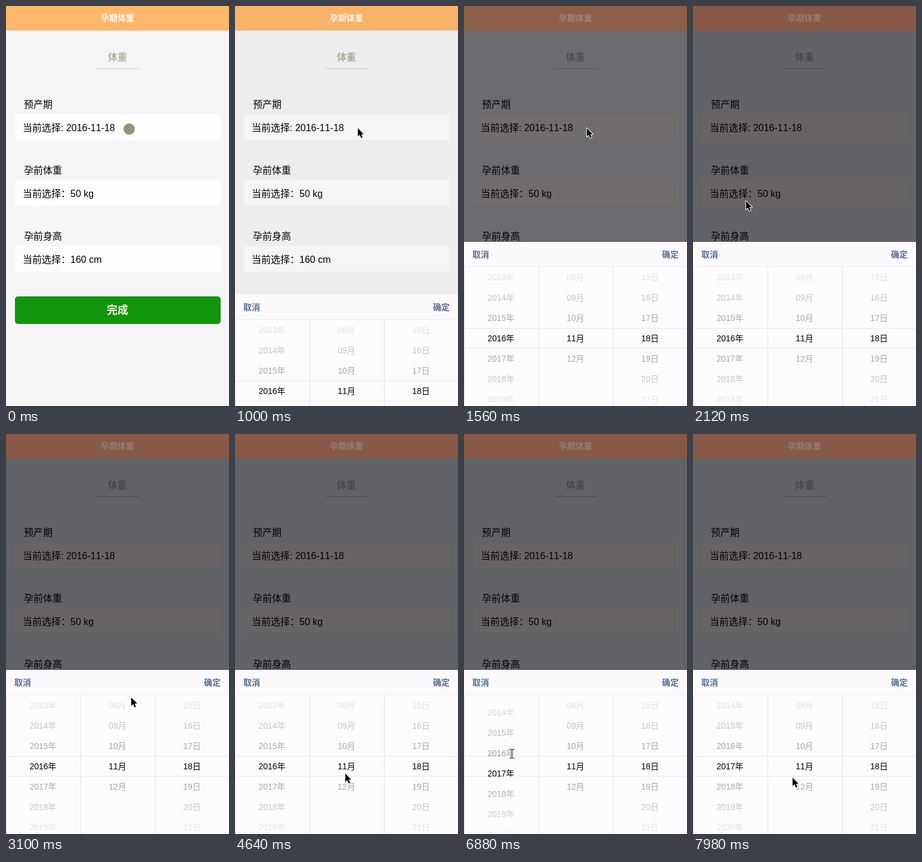
Write an HTML page with a canvas that moves like this. It is 374 by 668 pixels and loops after 8 s.

```html
<!DOCTYPE html>
<html lang="zh-CN">
<head>
<meta charset="utf-8">
<title>孕期体重</title>
<style>
  html, body { margin: 0; width: 100%; height: 100%; overflow: hidden; }
  canvas { display: block; width: 374px; height: 668px; }
</style>
</head>
<body>
<canvas id="stage"></canvas>
<script>
const W = 374, H = 668, LOOP = 8000;
const ROW = 34, SELECTED_Y = 555, PANEL_TOP = 394, LIST_TOP = 436;
const FAMILY = '"Liberation Sans", "Noto Sans CJK SC", "Noto Sans CJK", sans-serif';
const canvas = document.getElementById('stage');
const ctx = canvas.getContext('2d');
const ratio = window.devicePixelRatio || 1;
canvas.width = W * ratio;
canvas.height = H * ratio;
ctx.fontKerning = 'none';

// Text shades fade away from the selected row.
const listInk = ctx.createLinearGradient(0, LIST_TOP, 0, H);
[[436, '#f0f0f1'], [539, '#999'], [539, '#000'], [572, '#000'], [572, '#999'], [668, '#ededee']]
  .forEach(([y, color]) => listInk.addColorStop((y - LIST_TOP) / (H - LIST_TOP), color));

// time, x, y of the pointer tip
const POINTER_PATH = [
  [0, 206, 204], [1700, 206, 204], [2450, 8, 410], [2600, 5, 412], [2850, 364, 415],
  [3100, 210, 440], [3400, 200, 470], [4300, 185, 567], [5000, 185, 567],
  [5400, 355, 562], [6200, 80, 556], [6600, 80, 556], [6880, 80, 534],
  [7250, 80, 534], [7800, 167, 574], [8000, 167, 574]
];

const clamp = v => Math.min(1, Math.max(0, v));
const progress = (t, from, to) => clamp((t - from) / (to - from));
const smooth = p => p * p * (3 - 2 * p);
const easeOut = p => 1 - (1 - p) ** 3;
const lerp = (a, b, p) => a + (b - a) * p;
const mix = (a, b, p) => `rgb(${a.map((v, i) => Math.round(lerp(v, b[i], p))).join()})`;

function rect(x, y, w, h, color) {
  ctx.fillStyle = color;
  ctx.fillRect(x, y, w, h);
}

function text(str, x, y, size, color, align = 'left', weight = 400) {
  ctx.font = `${weight} ${size}px ${FAMILY}`;
  ctx.textAlign = align;
  ctx.fillStyle = color;
  ctx.fillText(str, x, y);
}

function drawField(label, value, y, dim) {
  text(label, 30, y - 10, 16, '#000');
  rect(15, y, 345, 45, mix([246, 246, 244], [101, 98, 99], dim));
  rect(15, y + 1, 345, 43, mix([253, 253, 255], [104, 100, 101], dim));
  text(value, 28, y + 29, 16, '#000');
}

function drawPage(dim) {
  rect(0, 0, W, H, mix([245, 245, 246], [97, 99, 102], dim));
  rect(0, 0, W, 41, mix([255, 183, 108], [135, 89, 70], dim));
  text('孕期体重', 187, 25, 14, mix([255, 250, 238], [152, 124, 114], dim), 'center', 700);
  text('体重', 187, 91, 16, mix([180, 177, 158], [72, 72, 72], dim), 'center', 700);
  rect(152, 104, 72, 1, mix([205, 206, 180], [72, 74, 76], dim));
  drawField('预产期', '当前选择: 2016-11-18', 180, dim);
  drawField('孕前体重', '当前选择：50 kg', 290, dim);
  drawField('孕前身高', '当前选择：160 cm', 400, dim);
  ctx.fillStyle = mix([17, 149, 12], [7, 60, 5], dim);
  ctx.beginPath();
  ctx.roundRect(15, 485, 345, 46, 5);
  ctx.fill();
  text('完成', 187, 514, 18, mix([248, 250, 225], [100, 102, 95], dim), 'center', 700);
}

function drawColumn(x, selected, first, last, unit, shift) {
  for (let n = first; n <= last; n++) {
    const y = SELECTED_Y + (n - selected) * ROW - shift;
    text(String(n).padStart(2, '0') + unit, x, y + 5, 14, listInk, 'center');
  }
}

function drawPanel(offset, shift) {
  ctx.save();
  ctx.translate(0, offset);
  rect(0, PANEL_TOP, W, H - PANEL_TOP, '#fcfcfe');
  rect(0, PANEL_TOP, W, LIST_TOP - PANEL_TOP, '#fbf9fc');
  text('取消', 14, 420, 14, '#586c94', 'left', 700);
  text('确定', 360, 420, 14, '#586c94', 'right', 700);
  rect(0, 435, W, 1, '#ececee');
  for (const x of [0, 125, 250]) rect(x, LIST_TOP, 1, H - LIST_TOP, '#e4e4e8');
  for (const y of [538, 571]) rect(0, y, W, 1, '#e6e6ec');
  ctx.beginPath();
  ctx.rect(0, LIST_TOP, W, H - LIST_TOP);
  ctx.clip();
  drawColumn(62, 2016, 2012, 2021, '年', shift);
  drawColumn(187, 11, 8, 12, '月', 0);
  drawColumn(312, 18, 15, 21, '日', 0);
  ctx.restore();
}

function pointerAt(t) {
  const i = Math.max(1, POINTER_PATH.findIndex(p => p[0] > t));
  const [t0, x0, y0] = POINTER_PATH[i - 1], [t1, x1, y1] = POINTER_PATH[i];
  const p = smooth(progress(t, t0, t1));
  return [lerp(x0, x1, p), lerp(y0, y1, p)];
}

function outlined(path, outline, fill) {
  ctx.lineWidth = 2;
  ctx.lineJoin = 'round';
  ctx.strokeStyle = outline;
  ctx.stroke(path);
  ctx.fillStyle = fill;
  ctx.fill(path);
}

const arrow = new Path2D('M0 0V14L3.2 11L5.6 16.4L8 15.3L5.7 10.2H10Z');
const iBeam = new Path2D('M-3.5 -8H-1L0.5 -7L2 -8H4.5V-7H2L1 -6V6L2 7H4.5V8H2L0.5 7L-1 8H-3.5V7H-1L0 6V-6L-1 -7H-3.5Z');

function drawPointer(t) {
  const [x, y] = pointerAt(t);
  ctx.save();
  ctx.translate(x, y);
  if (t < 900) {
    ctx.fillStyle = '#969478';
    ctx.beginPath();
    ctx.arc(0.5, 1.5, 9.5, 0, Math.PI * 2);
    ctx.fill();
  } else if (y > 500 && x > 38 && x < 86) {
    outlined(iBeam, 'rgba(255,255,255,.8)', '#000');
  } else {
    outlined(arrow, '#fff', '#000');
  }
  ctx.restore();
}

function draw(t) {
  ctx.setTransform(ratio, 0, 0, ratio, 0, 0);
  drawPage(progress(t, 965, 1600));
  const slide = easeOut(progress(t, 900, 1220));
  const drag = 22 * smooth(progress(t, 6600, 6880));
  const snap = 12 * easeOut(progress(t, 6960, 7250));
  if (slide > 0) drawPanel((1 - slide) * (H - PANEL_TOP), drag + snap);
  drawPointer(t);
}

const start = performance.now();
function tick() {
  draw((performance.now() - start) % LOOP);
  requestAnimationFrame(tick);
}
tick();
</script>
</body>
</html>
```
